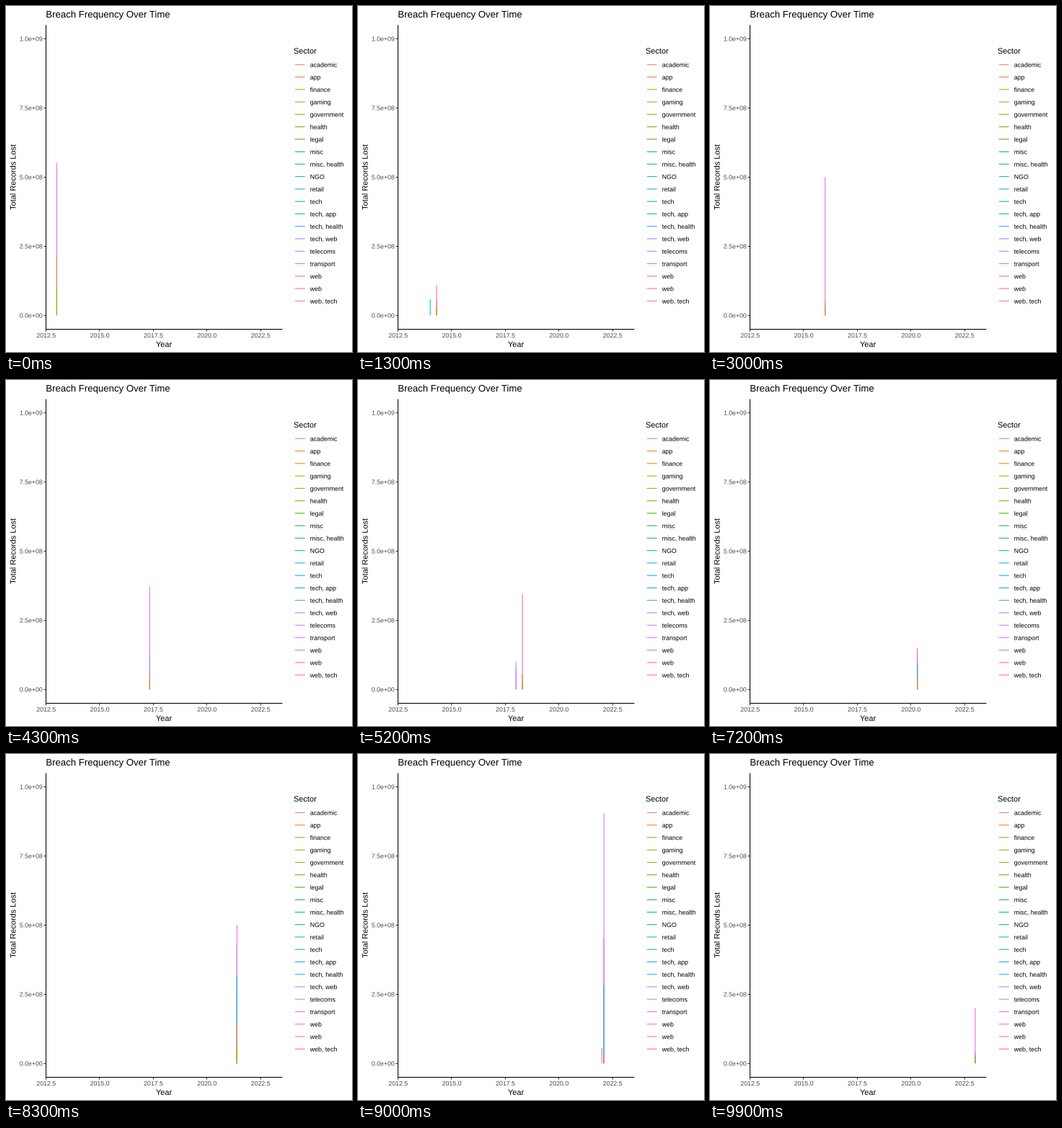
A matplotlib script that plays this animation: 480x480 px, repeating every 10 s.

```python
import matplotlib.pyplot as plt
import numpy as np
from matplotlib.animation import FuncAnimation
from matplotlib.collections import LineCollection
from matplotlib.patches import PathPatch
from matplotlib.textpath import TextPath
from matplotlib.transforms import Affine2D

plt.rcParams["font.family"] = "Liberation Sans"

SIZE, DPI, FRAMES = 480, 80, 100
LINE = 1.07 * 72 / DPI
LEFT, RIGHT, TOP, BOTTOM = 55.1, 382.8, 26, 448.4
FIRST, LAST = 2013, 2023
GREY = "#4d4d4d"

SECTORS = [
    "academic", "app", "finance", "gaming", "government", "health", "legal",
    "misc", "misc, health", "NGO", "retail", "tech", "tech, app",
    "tech, health", "tech, web", "telecoms", "transport", "web", "web",
    "web, tech",
]
APP, GOVERNMENT, RETAIL, TECH_APP, TECH_WEB = 1, 4, 10, 12, 14
TELECOMS, TRANSPORT, WEB, WEB_2 = 15, 16, 17, 18

# Sector, first year, yearly peaks in billions of records
RUNS = [
    (WEB, 2013, [.55, .096, .14, .5]),
    (WEB, 2019, [.419, .19, 0, 0, .2]),
    (WEB_2, 2018, [.493, 0, 0, .5, .5, 0]),
    (TRANSPORT, 2017, [.519, .075]),
    (TECH_WEB, 2017, [.14, .1]),
    (TELECOMS, 2021, [.036, 1, .04]),
    (TECH_APP, 2020, [0, .315, .315, 0]),
    (RETAIL, 2014, [.058]),
    (RETAIL, 2019, [.381]),
]

# Small sectors hover around a level and surge in two years
rng = np.random.default_rng(4)
for sector, level, last in [(APP, .055, 2022), (GOVERNMENT, .026, 2023)]:
    years = np.arange(FIRST, last + 1)
    surge = np.where(np.isin(years, [2013, 2021]), 3.6, 1)
    RUNS.append((sector, FIRST, level * surge * rng.uniform(.9, 1.1, years.size)))


def hue(i, chroma=100, light=65):
    """Evenly spaced hue in polar CIE LUV, as an sRGB triple."""
    angle = np.radians(15 + 360 * i / len(SECTORS))
    u = chroma * np.cos(angle) / (13 * light) + .1978
    v = chroma * np.sin(angle) / (13 * light) + .4683
    y = ((light + 16) / 116) ** 3
    xyz = [9 * y * u / (4 * v), y, y * (12 - 3 * u - 20 * v) / (4 * v)]
    to_rgb = [[3.2405, -1.5371, -.4985], [-.9693, 1.8760, .0416], [.0556, -.2040, 1.0572]]
    rgb = np.clip(np.dot(to_rgb, xyz), 0, 1)
    return np.where(rgb > .0031308, 1.055 * rgb ** (1 / 2.4) - .055, 12.92 * rgb)


def px(year):
    return 55.55 + 29.75 * (year - 2012.5)


def py(billions):
    return 429.2 - 383.8 * billions


fig = plt.figure(figsize=(SIZE / DPI, SIZE / DPI), dpi=DPI, facecolor="white")
ax = fig.add_axes([0, 0, 1, 1])
ax.set(xlim=(0, SIZE), ylim=(SIZE, 0))
ax.axis("off")


def text(x, y, s, size, color="black", align=0, angle=0):
    """Text on a baseline; align is 0 for left, .5 for centre, 1 for right."""
    path = TextPath((0, 0), s, size=size)
    shift = -align * path.get_extents().x1
    place = Affine2D().translate(shift, 0).scale(1, -1).rotate_deg(-angle).translate(x, y)
    ax.add_patch(PathPatch(place.transform_path(path), fc=color, lw=0, snap=False))


def line(xs, ys, color, snap=None):
    ax.plot(xs, ys, color=color, lw=LINE, solid_capstyle="butt", snap=snap)


def draw_axes():
    text(55.3, 16, "Breach Frequency Over Time", 13.2)
    text((LEFT + RIGHT) / 2, 473, "Year", 11, align=.5)
    text(13.4, 237.5, "Total Records Lost", 11, align=.5, angle=90)
    for i in range(5):
        y, year = py(i / 4), 2012.5 + 2.5 * i
        line([LEFT - 2.75, LEFT], [y, y], "#333333")
        text(50.4, y + 3.2, f"{i * 2.5e8:.1e}", 8.8, GREY, align=1)
        line([px(year) - .5] * 2, [BOTTOM, BOTTOM + 2.75], "#333333")
        text(px(year), 460, f"{year:.1f}", 8.8, GREY, align=.5)
    line([LEFT, LEFT], [TOP, BOTTOM + .5], "black")
    line([LEFT - .5, RIGHT], [BOTTOM, BOTTOM], "black")


def draw_legend():
    text(399, 66, "Sector", 11)
    for i, name in enumerate(SECTORS):
        y = 81.3 + 17.26 * i
        line([400.9, 414.7], [y, y], hue(i), snap=False)
        text(421.8, y + 3.3, name, 8.8)


draw_axes()
draw_legend()
bars = LineCollection([], linewidths=LINE, capstyle="butt", snap=False)
ax.add_collection(bars, autolim=False)

# Frame on which each year begins
starts = [((FRAMES - 1) * k + 4) // 10 for k in range(LAST - FIRST + 1)]


def update(frame):
    now = np.interp(frame, starts, np.arange(FIRST, LAST + 1))
    shown = []
    for sector, first, peaks in RUNS:
        last = first + len(peaks) - 1
        # A run that has ended waits in place until the next year begins
        if first <= now < last + 1:
            at = min(now, last)
            top = np.interp(at, np.arange(first, last + 1), peaks)
            if top > 1e-6:
                shown.append((top, px(at), hue(sector)))
    shown.sort(key=lambda bar: -bar[0])
    bars.set_segments([[(x, py(0)), (x, py(top))] for top, x, _ in shown])
    bars.set_color([color for *_, color in shown])
    return [bars]


anim = FuncAnimation(fig, update, frames=FRAMES, interval=100, repeat=True,
                     repeat_delay=0, blit=False)
plt.show()
```
